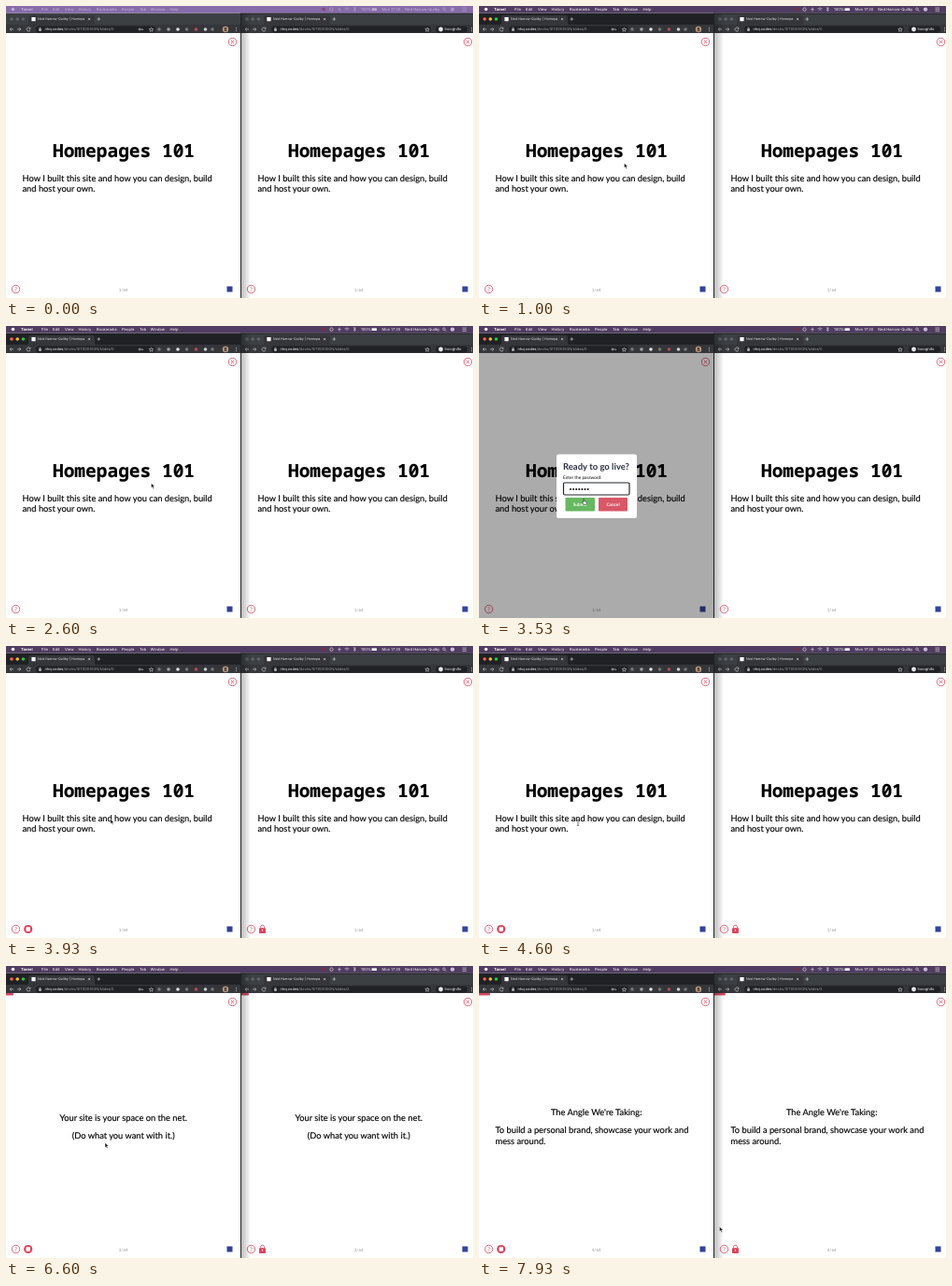
An HTML page that plays this animation: 500 by 313 pixels, repeating every 8000 ms.

```html
<!DOCTYPE html>
<html lang="en">
<head>
<meta charset="utf-8">
<title>Live slides</title>
<style>
  html, body { margin: 0; width: 100%; height: 100%; overflow: hidden; background: #fff; }
  svg { display: block; width: 100vw; height: 100vh; }
  text { font: 9.3px Lato, sans-serif; text-rendering: geometricPrecision; white-space: pre; }
  .slide text { stroke: #000; stroke-width: .15; }
  .title { font: 800 19.5px "Noto Sans Mono", monospace; }
  .ui { font: 4.1px Inter, sans-serif; fill: #fff; }
  .tab { font-size: 3.6px; fill: #dfe1e5; }
  .url { font-size: 4px; fill: #9aa0a6; }
  .bold { font-weight: 700; }
  .heading { font-size: 9.5px; fill: #2c3042; }
  .small { font-size: 4.75px; }
  .count { font-size: 4.5px; fill: #999; }
  .mid { text-anchor: middle; }
  .red { fill: #d8475f; }
  .line { fill: none; stroke: #d8475f; stroke-width: .8; }
  .icon { fill: none; stroke: #c4c7cb; stroke-width: .7; }
</style>
</head>
<body>
<svg id="stage" viewBox="0 0 500 313" preserveAspectRatio="none"></svg>
<script>
const LOOP = 8000, SLIDES = 64, WIDTH = 251, PAGE_TOP = 29;
const OWNER = "Ned Harrow-Quilby";
const FOCUS_AT = 700, MODAL_AT = 2680, SUBMIT_AT = 3700, LIVE_AT = 3800;
const SLIDE_TIMES = [0, 5300, 5650, 7250];
const FOLLOW_DELAY = 70;

const text = (x, y, str, cls = "", extra = "") =>
  `<text x="${x}" y="${y}" class="${cls}" ${extra}>${str}</text>`;
const rect = (x, y, w, h, fill, r = 0, extra = "") =>
  `<rect x="${x}" y="${y}" width="${w}" height="${h}" rx="${r}" fill="${fill}" ${extra}/>`;
const dot = (x, y, r, fill, extra = "") =>
  `<circle cx="${x}" cy="${y}" r="${r}" fill="${fill}" ${extra}/>`;
const path = (d, cls = "icon", extra = "") => `<path d="${d}" class="${cls}" ${extra}/>`;

const slides = [
  text(126, 162, "Homepages 101", "title mid") +
    text(17.5, 187.5, "How I built this site and how you can design, build") +
    text(17.5, 199.3, "and host your own."),
  "",
  text(125.7, 166, "Your site is your space on the net.", "mid") +
    text(125.7, 185, "(Do what you want with it.)", "mid"),
  text(125.7, 160.3, "The Angle We're Taking:", "mid") +
    text(17.5, 179, "To build a personal brand, showcase your work and") +
    text(17.5, 190.7, "mess around.")
];

function menuBar() {
  const items = [["File", 38], ["Edit", 50], ["View", 63], ["History", 77.5],
    ["Bookmarks", 97], ["People", 124], ["Tab", 143], ["Window", 154.5], ["Help", 175.5]];
  return rect(0, 0, 500, 7.5, "", 0, 'id="menuBack"') + '<g id="menuItems">' +
    dot(7.5, 3.5, 1.8, "#eee") + text(16, 5, "Tarnel", "ui bold") +
    items.map(([label, x]) => text(x, 5, label, "ui")).join("") +
    dot(340, 3.6, 1.9, "#7a2f3c") + dot(348.5, 3.6, 1.7, "none", 'stroke="#ddd" stroke-width=".7"') +
    path("M355 3.6h4M357 1.6v4M362.5 3q2.5-2 5 0M363.7 4.2q1.3-1 2.6 0M372 1.5l2.4 3-1.2 1v-4l1.2 1-2.4 2.5") +
    text(380, 5, "100%", "ui") + rect(391.5, 2.2, 5.5, 2.8, "#eee", .6) +
    text(402.5, 5, "Mon 17:30", "ui") + text(427, 5, OWNER, "ui") +
    dot(469, 3.2, 1.3, "none", 'stroke="#ddd" stroke-width=".6"') + path("M470 4.2l1.4 1.5") +
    dot(478, 3.6, 2.2, "#c9c0dc") + path("M488.5 2h4.5M488.5 3.7h4.5M488.5 5.4h4.5") + "</g>";
}

function toolbarEnd(isPrivate) {
  if (isPrivate) {
    return path("M199 23.2l.7 1.3 1.5.2-1.1 1 .3 1.5-1.4-.7-1.4.7.3-1.5-1.1-1 1.5-.2z") +
      rect(208, 21.5, 34, 7, "#202124", 3.5) + dot(213.5, 25, 2.4, "#e8eaed") +
      text(217.5, 26.4, "Incognito", "ui");
  }
  const extensions = [[164, "#777"], [174, "#9aa0a6"], [184, "#e4e4e6"], [193.5, "#777"],
    [203.5, "#b64a58"], [213.5, "#ccc"], [221, "#777"]];
  return dot(143, 25, 1, "none", 'stroke="#c4c7cb" stroke-width=".7"') + path("M144 25h2.6v1") +
    path("M155.5 23.2l.7 1.3 1.5.2-1.1 1 .3 1.5-1.4-.7-1.4.7.3-1.5-1.1-1 1.5-.2z") +
    extensions.map(([x, fill]) => dot(x, 25, 1.8, fill)).join("") +
    dot(235, 25, 3.2, "#b99c86") + dot(235, 24.3, 1.3, "#4b382f") + path("M233 27q2-3 4 0z", "", 'fill="#4b382f"');
}

function browser(id, x, isPrivate) {
  const pillWidth = isPrivate ? 171 : 128;
  const liveIcon = isPrivate
    ? rect(19, 302.3, 7, 5.7, "#d8475f", .8) + path("M20.5 303v-1.8a2 2 0 0 1 4 0v1.8", "line") +
      dot(22.5, 304.8, .7, "#fff")
    : dot(23.7, 303.5, 4.6, "#d8475f") + rect(21.5, 301.3, 4.4, 4.4, "#fff", .8);
  return `<g id="${id}" transform="translate(${x} 0)">` +
    rect(0, 7.5, WIDTH, 22, "#3c4043", 0, 'class="strip"') +
    ["#ff5f57", "#febc2e", "#28c840"].map((c, i) => dot(6 + i * 6.2, 14, 1.8, "#5f6368", `class="light" data-color="${c}"`)).join("") +
    path("M22 20.3q2 0 2-2v-6q0-2.3 2.3-2.3h66.4q2.3 0 2.3 2.3v6q0 2 2 2z", "", 'fill="#35363a"') +
    rect(0, 20, WIDTH, 10, "#35363a") +
    rect(27.4, 12, 4.2, 4.2, "#fff", .5) + text(34, 15.3, OWNER + " | Homepa", "ui tab") +
    path("M88 13l2.2 2.2M90.2 13l-2.2 2.2M97.5 14h3.6M99.3 12.2v3.6") +
    path("M8 25H4.2m1.6-1.6L4.2 25l1.6 1.6M12 25h3.8m-1.6-1.6l1.6 1.6-1.6 1.6M25.8 24a2 2 0 1 0 .2 1.6m0-2.6v1.3h-1.4") +
    rect(32, 21.4, pillWidth, 7, "#202124", 3.5) +
    rect(35.2, 24.6, 2.6, 2.1, "#c4c7cb", .3) + path("M35.8 24.8v-.8a.7.7 0 0 1 1.4 0v.8") +
    '<text x="41.5" y="26.4" class="ui url"><tspan fill="#fff">nhq.codes</tspan>/decks/SITEDESIGN/slides/<tspan class="number">0</tspan></text>' +
    toolbarEnd(isPrivate) + [23.2, 25, 26.8].map(y => dot(246.5, y, .5, "#c4c7cb")).join("") +
    rect(0, PAGE_TOP, WIDTH, 313 - PAGE_TOP, "#fff") +
    slides.map(s => `<g class="slide">${s}</g>`).join("") +
    rect(0, PAGE_TOP, 0, 2.5, "#d8475f", 0, 'class="progress"') +
    dot(242.5, 38.5, 4.1, "none", 'class="line"') + path("M240.9 36.9l3.2 3.2M244.1 36.9l-3.2 3.2", "line") +
    dot(10.5, 303.5, 4.2, "none", 'class="line"') + text(10.5, 305.8, "?", "mid red", 'style="font-size:6.3px"') +
    `<g class="live">${liveIcon}</g>` +
    text(125.7, 305.7, "", "count mid") + rect(236.5, 300.5, 6, 6, "#33419c") + "</g>";
}

function modal() {
  let bullets = "";
  for (let i = 0; i < 7; i++) bullets += dot(98 + i * 3.1, 175, 1.05, "#111", 'class="bullet"');
  return '<g id="modal">' + rect(0, PAGE_TOP, WIDTH, 313 - PAGE_TOP, "#000", 0, 'opacity=".33"') +
    rect(83, 137.5, 86, 68.5, "#fff", 2.5) +
    text(90, 154, "Ready to go live?", "bold heading") +
    text(90, 163.8, "Enter the password:", "small") +
    rect(90.5, 168, 70.5, 13, "#fff", 1.2, 'stroke="#25262c" stroke-width="1.2"') + bullets +
    rect(92.5, 184, 31.5, 14.5, "#66b861", .8) + rect(128, 184, 31, 14.5, "#d85768", .8) +
    text(108.2, 193, "Submit", "small bold mid", 'fill="#fff"') +
    text(143.5, 193, "Cancel", "small bold mid", 'fill="#fff"') + "</g>";
}

const cursors = '<g id="cursor">' +
  path("M0 0v5l1.2-1 .9 1.9 .9-.4-.9-1.9h1.6z", "pointer", 'fill="#111" stroke="#fff" stroke-width=".4"') +
  path("M-.4 0q.7-.7 1 .3v2l2 .5q.8.4.5 1.6l-.6 1.6H.3L-1.2 3.7q.2-.8.9-.3z", "pointer", 'fill="#fff" stroke="#111" stroke-width=".5"') +
  path("M-1.2-3q1.2 0 1.2.7 0-.7 1.2-.7M0-2.3v4.6M-1.2 3Q0 3 0 2.3 0 3 1.2 3", "pointer", 'fill="none" stroke="#111" stroke-width=".6"') + "</g>";

const stage = document.getElementById("stage");
stage.innerHTML =
  '<defs><linearGradient id="shade"><stop stop-color="#000" stop-opacity=".6"/>' +
  '<stop offset=".12" stop-color="#000" stop-opacity=".25"/><stop offset="1" stop-color="#000" stop-opacity="0"/></linearGradient></defs>' +
  rect(WIDTH, 7.5, 1, 306, "#3c4043") + browser("viewer", 252, true) + rect(WIDTH, 7.5, 11, 306, "url(#shade)") +
  rect(WIDTH, 7.5, 249, 1, "#1b1b1d") + browser("host", 0, false) + modal() + menuBar() + cursors;

const $ = selector => stage.querySelector(selector);
const $$ = selector => [...stage.querySelectorAll(selector)];
const show = (node, on) => node.setAttribute("display", on ? "inline" : "none");
const pointers = $$(".pointer"), bullets = $$(".bullet");

// Cursor stops: time, x, y
const route = [[0, -8, 190], [200, -8, 190], [600, 155.5, 168.5], [3180, 155.5, 168.5],
  [3450, 112, 185.5], [3900, 112, 185.5], [4200, 106, 189.5], [7350, 106, 189.5], [7750, 257.5, 279.5], [LOOP, 257.5, 279.5]];

function cursorAt(t) {
  const i = route.findIndex(stop => stop[0] > t);
  const [t0, x0, y0] = route[i - 1], [t1, x1, y1] = route[i];
  const p = (t - t0) / (t1 - t0), ease = p * p * (3 - 2 * p);
  return [x0 + (x1 - x0) * ease, y0 + (y1 - y0) * ease];
}

function updateBrowser(id, t) {
  const find = selector => $(`#${id} ${selector}`);
  const index = SLIDE_TIMES.filter(start => start <= Math.max(t, 0)).length - 1;
  $$(`#${id} .slide`).forEach((node, i) => show(node, i === index));
  find(".number").textContent = index;
  find(".count").textContent = `${index + 1}/${SLIDES}`;
  find(".progress").setAttribute("width", index / SLIDES * WIDTH);
  show(find(".live"), t >= LIVE_AT);
}

function render(t) {
  const focused = t >= FOCUS_AT;
  $("#menuBack").setAttribute("fill", focused ? "#503d61" : "#876baa");
  $("#menuItems").setAttribute("opacity", focused ? 1 : .5);
  $("#host .strip").setAttribute("fill", focused ? "#202124" : "#3c4043");
  $$("#host .light").forEach(light => light.setAttribute("fill", focused ? light.dataset.color : "#5f6368"));

  updateBrowser("host", t);
  updateBrowser("viewer", t - FOLLOW_DELAY);
  show($("#modal"), t >= MODAL_AT && t < SUBMIT_AT);
  bullets.forEach((bullet, i) => show(bullet, t >= MODAL_AT + 100 + i * 60));

  const shape = t >= 3400 && t < SUBMIT_AT ? 1 : t >= 4150 && t < SLIDE_TIMES[1] ? 2 : 0;
  pointers.forEach((pointer, i) => show(pointer, i === shape));
  $("#cursor").setAttribute("transform", `translate(${cursorAt(t)})`);
}

function tick() {
  render(performance.now() % LOOP);
  requestAnimationFrame(tick);
}
tick();
</script>
</body>
</html>
```
